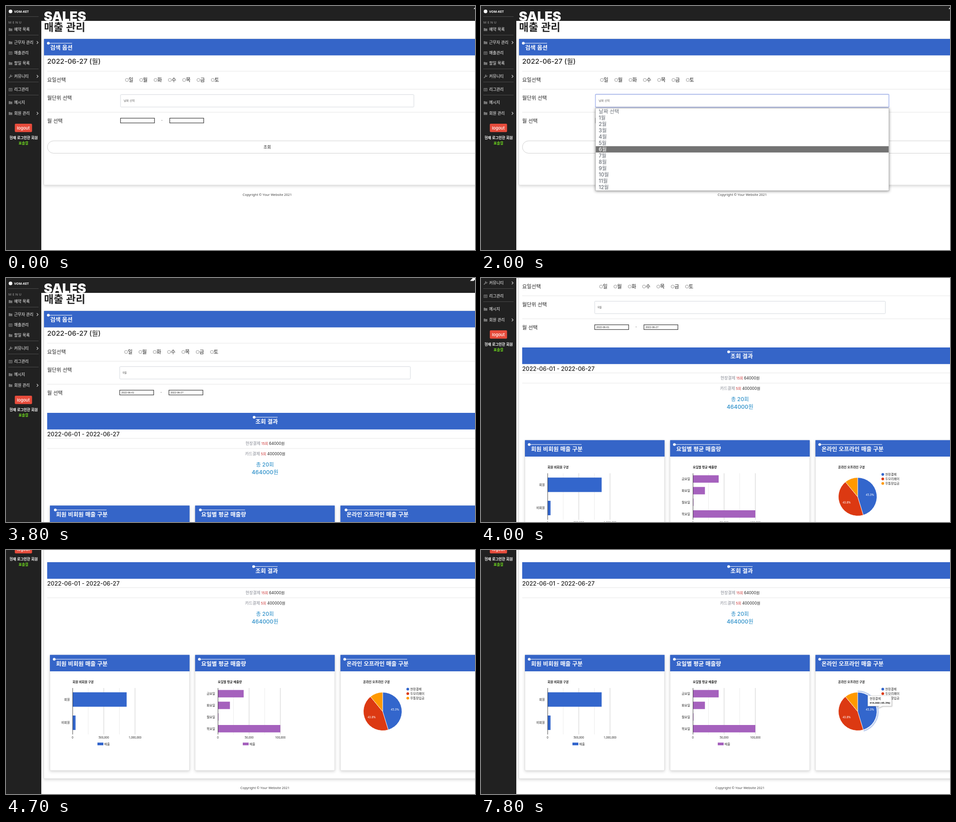
An HTML page that plays this animation: 1036 px wide and 541 px high, repeating every 8000 ms.

```html
<!DOCTYPE html>
<html lang="ko">
<head>
<meta charset="utf-8">
<title>매출 관리</title>
<style>
  html, body { margin: 0; width: 100%; height: 100%; overflow: hidden; background: #212121; }
  svg { display: block; width: 1036px; height: 541px; background: #212121; }
  text { font-family: "Noto Sans CJK KR", "Noto Sans CJK JP", "Noto Sans CJK", sans-serif; fill: #222; white-space: pre; }
  .mix { font-family: Inter, "Noto Sans CJK KR", "Noto Sans CJK JP", sans-serif; }
  .lat { font-family: "Noto Sans", "Noto Sans CJK KR", "Noto Sans CJK JP", sans-serif; }
  .inp { font-family: "Liberation Sans", sans-serif; }
  .m { font-weight: 500; }
  .b { font-weight: 700; }
  .k { font-weight: 900; }
  .mid { text-anchor: middle; }
  .end { text-anchor: end; }
  .w { fill: #fff; }
  .card { fill: #fff; stroke: #dcdcdc; filter: drop-shadow(0 2px 3px rgba(0,0,0,.16)); }
  .tip { fill: #fff; stroke: #ccc; stroke-width: .7; filter: drop-shadow(1px 1px 1px rgba(0,0,0,.25)); }
  .drop { fill: #fff; stroke: #aaa; stroke-width: .8; filter: drop-shadow(0 1px 3px rgba(0,0,0,.45)); }
</style>
</head>
<body>
<svg id="stage" viewBox="0 0 1036 541"></svg>
<script>
const LOOP = 8000, FRAME = 100;
const BLUE = '#3565c8', CHART_BLUE = '#3366cc', RED = '#dc3912', ORANGE = '#ff9900', PURPLE = '#a561bd';

const text = (x, y, size, str, cls = '', fill = '') =>
  `<text x="${x}" y="${y}" font-size="${size}" class="${cls}"${fill && ` style="fill:${fill}"`}>${str}</text>`;
const rect = (x, y, w, h, fill, more = '') =>
  `<rect x="${x}" y="${y}" width="${w}" height="${h}" fill="${fill}" ${more}/>`;
const line = (x1, y1, x2, y2, stroke, more = '') =>
  `<line x1="${x1}" y1="${y1}" x2="${x2}" y2="${y2}" stroke="${stroke}" ${more}/>`;
const dot = (x, y, r, fill, more = '') => `<circle cx="${x}" cy="${y}" r="${r}" fill="${fill}" ${more}/>`;
const during = (from, to, body) => `<g data-from="${from}" data-to="${to}">${body}</g>`;
const rule = y => line(91, y, 1036, y, '#e6e6e6');

// Sidebar
const GREY = '#747474';
const icons = {
  folder: y => `<path d="M6 ${y - 3}h3l1 1h4v5.6h-8z" fill="${GREY}"/>`,
  table: y => rect(6.5, y - 2.5, 7, 6, 'none', `stroke="${GREY}"`) +
    `<path d="M6 ${y - 2}h8M6 ${y + .8}h8M10 ${y - 2}v5" stroke="${GREY}"/>`,
  wrench: y => `<path d="M7 ${y + 3}l4 -4" stroke="${GREY}" stroke-width="2" stroke-linecap="round"/>` +
    `<path d="M13.5 ${y - 2}a2 2 0 1 1 -2 -1.6" fill="none" stroke="${GREY}" stroke-width="1.5"/>`
};
const menu = [
  ['folder', 52, '예약 목록'], ['folder', 81, '근무자 관리', 1], ['table', 104, '매출관리'],
  ['folder', 127, '할일 목록'], ['wrench', 156, '커뮤니티', 1], ['table', 185, '리그관리'],
  ['folder', 214, '메시지'], ['folder', 238, '회원 관리', 1]
];
const sidebar = () =>
  dot(10, 12, 4, '#fff') + text(18, 14.6, 7.2, 'VOM-KET', 'lat b w') +
  text(5, 38.6, 7.6, 'MENU', 'lat b', GREY).replace('<text', '<text letter-spacing="2"') +
  [23.5, 64.5, 139.5, 168.5, 197.5].map(y => line(5, y, 72, y, '#4b4b4b')).join('') +
  menu.map(([icon, y, label, arrow]) => icons[icon](y) + text(18, y + 3.2, 8.7, label, 'm w') +
    (arrow ? `<path d="M68 ${y - 3}l3 3l-3 3" fill="none" stroke="#ccc" stroke-width="1.2"/>` : '')).join('') +
  rect(19.5, 261, 38, 18.5, '#e74c3c', 'rx="2"') + text(38.3, 273.6, 9.3, 'logout', 'mix m w mid') +
  text(39, 295, 7.9, '현재 로그인한 회원', 'b w mid') + text(38.5, 307, 7.8, '표솔결', 'b mid', '#6fdc1e');

// Blue bar heading with the dotted rule above its text
const heading = (x, y, end, str, grows) =>
  `<g class="${grows ? 'grow' : ''}" data-x="${x - 4}" data-end="${end}">` +
  line(x - 4, y - 14.5, end, y - 14.5, '#fff') + dot(x - 4, y - 14.5, 3, '#fff') + '</g>' +
  text(x, y, 12.5, str, 'b w');

// Search form
const input = (x, value) => rect(x + .5, 248.7, 75, 10.6, '#fff', 'stroke="#333" stroke-width="1.2"') +
  text(x + 4, 256, 5.6, value, 'inp');
const inputs = (x, from, to) => input(x, from) + text(x + 92, 257, 8, '-', 'mid') + input(x + 108.7, to);
const filled = x => text(x + 7, 212.3, 6, '6월', '', '#555') + inputs(x, '2022-06-01', '2022-06-27');
const fields = (x, width) =>
  [...'일월화수목금토'].map((day, i) => dot(x + 14.6 + i * 31.6, 164, 3.4, '#fff', 'stroke="#777" stroke-width=".8"') +
    text(x + 18.5 + i * 31.6, 168, 11.2, day, 'm')).join('') +
  rect(x + .5, 196.5, width, 27.5, '#fff', 'rx="1.5" stroke="#d3d7dd"');

const form = () =>
  rect(84, 73, 1000, 36.5, BLUE) + heading(97.5, 97, 146, '검색 옵션') +
  text(91, 127.7, 15.2, '2022-06-27 (월)', 'mix m') + [144.5, 184.5, 235.5].map(rule).join('') +
  text(91, 168, 11.2, '요일선택', 'm') + text(91, 208, 11.2, '월단위 선택', 'm') + text(91, 259, 11.2, '월 선택', 'm');

const options = ['날짜 선택', ...Array.from({ length: 12 }, (_, i) => `${i + 1}월`)];
const option = (i, fill) => text(260, 237.5 + i * 14, 11.4, options[i], 'mix m', fill);
const hover = (i, from, to) => during(from, to, rect(253.5, 226.8 + i * 14, 647, 14, '#737373') + option(i, '#fff'));
const dropdown = () => during(1300, 2300,
  '<rect class="drop" x="253" y="226.5" width="648" height="183"/>' +
  options.map((_, i) => option(i, '#6b7078')).join('') +
  hover(0, 1300, 1700) + hover(3, 1700, 1800) + hover(5, 1800, 2000) + hover(6, 2000, 2300));
const ring = opacity => rect(252.6, 195.6, 648.6, 29, 'none',
  `rx="2" stroke="#aebdf2" stroke-width="1.6" opacity="${opacity}"`);
const footer = (x, y) => text(x, y, 7.4, 'Copyright © Your Website 2021', 'lat mid', '#444');

const search = () =>
  '<rect class="card" x="83.5" y="73" width="1000" height="324" rx="2"/>' + form() + fields(252.5, 648) +
  during(0, 2300, text(260, 212.3, 6.1, '날짜 선택', '', '#666') + inputs(252.5, '', '')) +
  during(2300, 3000, filled(252.5)) +
  rect(91.5, 299, 971, 27.5, '#fff', 'rx="13.7" stroke="#cfcfcf"') + text(577, 315.6, 9, '조회', 'm mid') +
  footer(577, 421) + during(1300, 1400, ring(.5)) + during(1400, 3000, ring(1)) + dropdown();

// Charts, drawn in the coordinates of the fully scrolled view
const axisChart = (x, title, color, max, thick, rows) =>
  text(x, 294.6, 6.7, title, 'b') +
  [1, 2, 3, 4].map(i => line(x + i * 34.5, 306, x + i * 34.5, 409, i % 2 ? '#ebebeb' : '#ccc')).join('') +
  rows.map(([label, value, y]) => rect(x, y - thick / 2, value / max * 138, thick, color) +
    text(x - 6, y + 2.4, 6.8, label, 'end')).join('') +
  line(x + .3, 306, x + .3, 409, '#333', 'stroke-width=".9"') +
  [0, max / 2, max].map(v => text(x + v / max * 138, 418.2, 6.2, v.toLocaleString('en-US'), 'lat mid')).join('') +
  rect(x + 55, 427, 13, 6, color) + text(x + 70, 432.6, 6.7, '매출');

const PIE = { x: 832, y: 358, r: 42.5 };
const slices = [
  ['현장결제', 414000, CHART_BLUE], ['두모리페이', 400000, RED], ['무통장입금', 100000, ORANGE]
];
const total = slices.reduce((sum, s) => sum + s[1], 0);
const startOf = i => slices.slice(0, i).reduce((sum, s) => sum + s[1], 0) / total;
const rim = (part, r) => {
  const a = part * 2 * Math.PI;
  return `${(PIE.x + r * Math.sin(a)).toFixed(2)} ${(PIE.y - r * Math.cos(a)).toFixed(2)}`;
};
const arc = (i, r) => `M${rim(startOf(i), r)}A${r} ${r} 0 0 1 ${rim(startOf(i + 1), r)}`;
const pie = () =>
  text(789, 294.6, 6.7, '온라인 오프라인 구분', 'b') +
  slices.map(([name, , color], i) =>
    `<path d="${arc(i, PIE.r)}L${PIE.x} ${PIE.y}z" fill="${color}" stroke="#fff" stroke-width=".8"/>` +
    dot(887.5, 308.6 + i * 10, 3, color) + text(893, 311 + i * 10, 6.8, name)).join('') +
  text(859, 356.3, 6.4, '45.3%', 'lat m w mid') + text(807.7, 373.3, 6.4, '43.8%', 'lat m w mid');

// Tooltips: a box, with a tail to the marked point where there is one
const tooltip = (x, y, w, tail, title, label, value) => {
  const h = 23, low = y + h;
  const point = tail ? `H${tail[0] + 10}L${tail[0]} ${tail[1]}L${tail[0] + 3} ${low}` : '';
  return `<path class="tip" d="M${x} ${y}H${x + w}V${low}${point}H${x}z"/>` +
    text(x + 4, y + 9.3, 6.7, title) +
    `<text x="${x + 4}" y="${y + 17.6}" font-size="6" class="lat">${label}<tspan class="b">${value}</tspan></text>`;
};
const barTip = (from, to, bar, color, x, y, w, title, value) => {
  const [bx, by, bw, bh] = bar;
  return during(from, to, rect(bx, by - 1.5, bw + 1.5, bh + 3, 'none', `stroke="${color}" stroke-opacity=".35"`) +
    tooltip(x, y, w, [bx + bw, by], title, '매출: ', value));
};
const sliceTip = (from, to, i, x, y, tail) => {
  const [name, value, color] = slices[i];
  return during(from, to,
    `<path d="${arc(i, PIE.r + 2.6)}" fill="none" stroke="${color}" stroke-width="3" stroke-opacity=".3"/>` +
    tooltip(x, y, 52.5, tail, name, '', `${value.toLocaleString('en-US')} (${(value / total * 100).toFixed(1)}%)`));
};
const tips = () =>
  barTip(5200, 5600, [147, 315.5, 119.5, 32], CHART_BLUE, 248, 288.5, 47, '회원', '866,000') +
  barTip(5700, 6100, [147, 367, 6.6, 32], CHART_BLUE, 138.5, 340, 43, '비회원', '48,000') +
  barTip(6600, 7100, [468, 388, 138, 16.4], PURPLE, 587.5, 361, 47, '목요일', '100,000') +
  sliceTip(7200, 7300, 1, 763, 383.5) +
  sliceTip(7300, 7700, 2, 785.5, 289.5, [813, 316]) +
  sliceTip(7800, LOOP, 0, 854.5, 323, [877, 350.5]);

// Results
const payment = (y, parts) => parts.map(([x, size, str, fill]) => text(x, y, size, str, 'mix', fill)).join('');
const chartCard = (x, end, title) =>
  `<rect class="card" x="${x}" y="505" width="308.5" height="256" rx="2"/>` +
  rect(x, 504.5, 308.5, 36.5, BLUE) + heading(x + 13.5, 528.7, end, title, true);

const results = () =>
  '<rect class="card" x="83.5" y="73" width="1000" height="706" rx="2"/>' + form() + fields(250.7, 642) + filled(250.7) +
  rect(91, 299, 1000, 36.8, BLUE) + heading(551, 323.2, 600, '조회 결과', true) +
  text(91, 350.7, 12.7, '2022-06-01 - 2022-06-27', 'mix m') + rule(355.5) + rule(378) +
  payment(370, [[529, 9, '현장결제', '#888b95'], [564, 7.7, '15회', '#cc3333'], [581, 8.5, '64000원', '#222']]) +
  payment(392.5, [[528, 9, '카드결제', '#888b95'], [563, 7.7, '5회', '#cc3333'], [577, 8.5, '400000원', '#222']]) +
  text(572, 417.6, 11.8, '총 20회', 'mix m mid', '#2b8fc9') +
  text(572.3, 434.8, 12.3, '464000원', 'mix m mid', '#2b8fc9') +
  chartCard(97, 222, '회원 비회원 매출 구분') + chartCard(417.7, 528, '요일별 평균 매출량') +
  chartCard(738.7, 886, '온라인 오프라인 매출 구분') +
  '<g transform="translate(0 272)">' +
  axisChart(147, '회원 비회원 구분', CHART_BLUE, 1e6, 32, [['회원', 866000, 331.5], ['비회원', 48000, 383]]) +
  axisChart(468, '요일별 평균 매출량', PURPLE, 1e5, 16.4,
    [['금요일', 41300, 318.6], ['화요일', 19300, 344.5], ['월요일', 1000, 370.2], ['목요일', 100000, 396.2]]) +
  pie() + tips() + '</g>' + footer(572, 802.3);

const corner = x => `<path d="M${x} 6.5l6 -6.5h8l-6 6.5z" fill="#fff"/>`;

const stage = document.getElementById('stage');
stage.innerHTML = '<g id="page">' + sidebar() + rect(78, 33, 958, 900, '#fff') +
  text(83.5, 33, 28.5, 'SALES', 'mix k w') + text(84, 54.6, 23, '매출 관리', 'k') +
  during(0, 3000, corner(1033) + search()) + during(3000, LOOP, corner(1025) + results()) + '</g>';

const page = document.getElementById('page');
const timed = [...stage.querySelectorAll('[data-from]')];
const growing = [...stage.querySelectorAll('.grow')];
const scrolls = [[0, 0], [3900, 52], [4000, 145], [4100, 196], [4200, 216], [4500, 253], [4600, 267], [4700, 272]];

function draw(t) {
  for (const el of timed) el.style.display = t >= el.dataset.from && t < el.dataset.to ? '' : 'none';
  const grown = 1 - (1 - Math.min(1, Math.max(0, (t - 3000) / 1000))) ** 2.4;
  for (const el of growing) {
    const x = el.dataset.end - (el.dataset.end - el.dataset.x) * grown;
    el.firstChild.setAttribute('x1', x);
    el.lastChild.setAttribute('cx', x);
  }
  const [, y] = scrolls.filter(([at]) => at <= t).pop();
  page.setAttribute('transform', `translate(0 ${-y})`);
}

const start = performance.now();
function tick() {
  const t = (performance.now() - start) % LOOP;
  draw(Math.floor(t / FRAME) * FRAME);
  requestAnimationFrame(tick);
}
tick();
</script>
</body>
</html>
```
